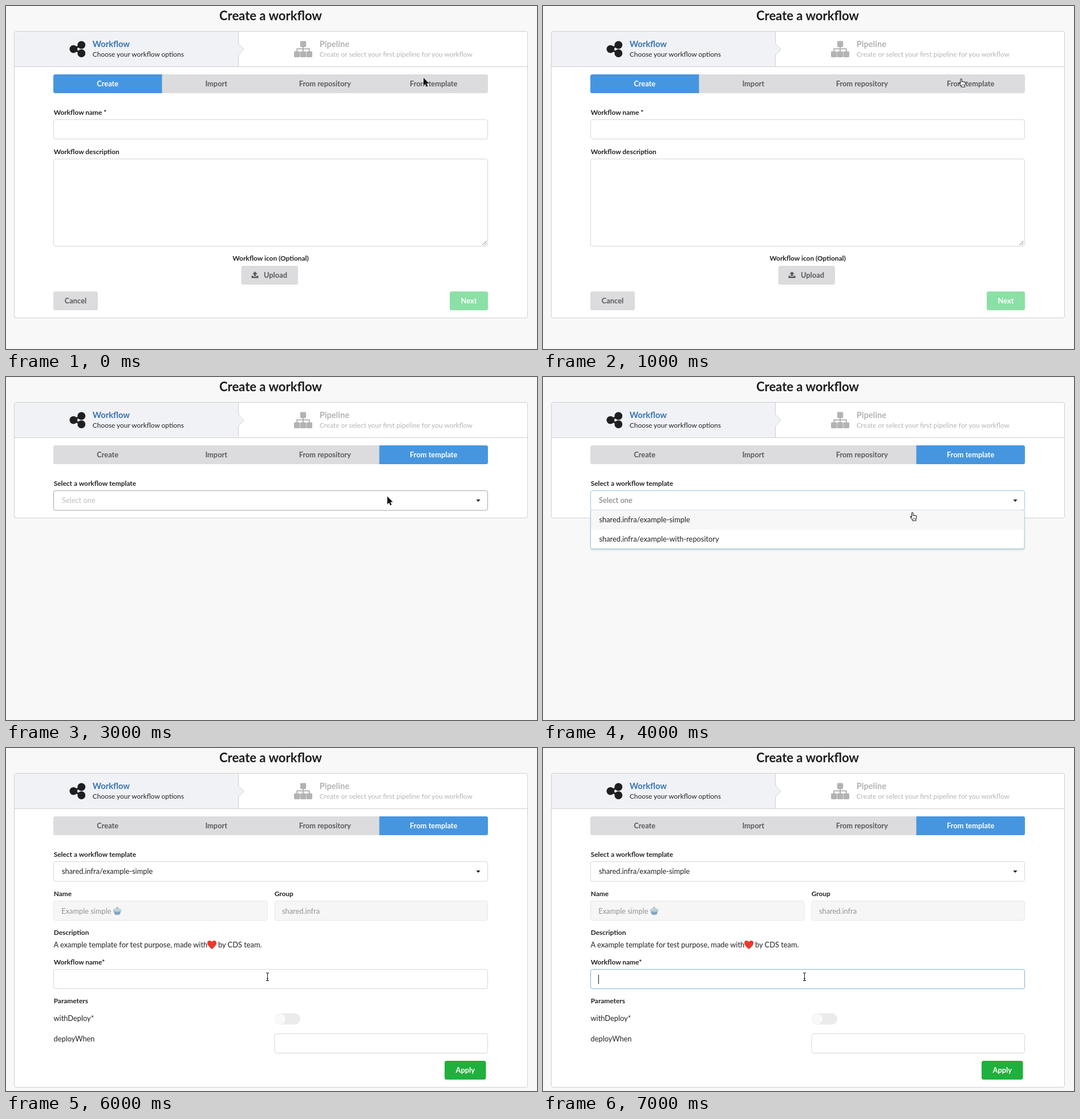
Write an HTML page that moves like this. It is 931 by 602 pixels and loops after 8000 ms.

```html
<!DOCTYPE html>
<html lang="en">
<head>
<meta charset="utf-8">
<title>Create a workflow</title>
<style>
  html, body { margin: 0; width: 100%; height: 100%; overflow: hidden; background: #f8f8f8; }
  svg { display: block; width: 100%; height: 100%; }
  text { font-family: Lato, sans-serif; font-size: 12.83px; fill: #222; }
  .label { font-size: 11.92px; font-weight: 700; }
  .small { font-size: 11.92px; }
  .bold { font-weight: 700; }
  .step { font-size: 14.67px; font-weight: 700; }
  .title { font-size: 22px; font-weight: 700; }
  .mid { text-anchor: middle; }
</style>
</head>
<body>
<svg id="stage" viewBox="0 0 931 602"></svg>
<script>
const GREY = '#dcdcde', BLUE = '#4696df', LINE = '#d6d6d7', MUTED = '#b3b3b3';

const text = (x, y, str, cls = '', fill = '#222') =>
  `<text x="${x}" y="${y}" class="${cls}" style="fill:${fill}">${str}</text>`;
const rect = (x, y, w, h, fill, r = 0, extra = '') =>
  `<rect x="${x}" y="${y}" width="${w}" height="${h}" rx="${r}" fill="${fill}" ${extra}/>`;
const path = (d, fill, extra = '') => `<path d="${d}" fill="${fill}" ${extra}/>`;
const stroke = (color, width = 1) => `stroke="${color}" stroke-width="${width}"`;
const at = (x, y, body) => `<g transform="translate(${x} ${y})">${body}</g>`;
const label = (y, str, x = 83.7) => text(x, y, str, 'label');

// Boxes are given by their outer edges; the one pixel border lies inside.
const box = (x, y, right, bottom, line = LINE, fill = '#fff') =>
  rect(x + .5, y + .5, right - x - 1, bottom - y - 1, fill, 3.5, stroke(line));
const button = (x, y, w, str, fill, color, textX = x + w / 2) =>
  rect(x, y, w, 33, fill, 3.5) + text(textX, y + 20.7, str, 'bold mid', color);
const caret = (x, y) => rect(x, y, 1, 16, '#111');

const cursors = {
  arrow: path('M0 0V14L3.2 11L5.3 15.8L7.6 14.8L5.5 10.1H9.8Z', '#111', stroke('#fff', 1) + ' paint-order="stroke"'),
  hand: path('M3 9V2.2Q3 .8 4.2 .8Q5.4 .8 5.4 2.2V6Q6.4 4.8 7.5 6.2Q8.6 5.2 9.5 6.7Q11.4 6 11.5 8.2Q11.5 11.5 10.3 13V15.3H4.6V13.8Q3 12 .8 9Q.4 7.4 1.6 7.7Z', '#fff',
    stroke('#222', 1.1) + ' stroke-linejoin="round"') + path('M5.6 10V13M7.3 10V13M9 10V13', 'none', stroke('#444', .7)),
  beam: path('M-2.5 -7Q0 -7 0 -5V5Q0 7 -2.5 7M2.5 -7Q0 -7 0 -5M0 5Q0 7 2.5 7M-1.5 3H1.5', 'none', stroke('#222', 1.1))
};

const shareIcon = path('M132.3 68.3L118.3 75.6L132.3 83', 'none', stroke('#1f1f22', 3.3)) +
  [[118.3, 75.6], [132.3, 68.3], [132.3, 83]].map(([x, y]) => `<circle cx="${x}" cy="${y}" r="6.9" fill="#1f1f22"/>`).join('');

const treeIcon = path('M521 70V80M510.2 80V75.3H531.8V80', 'none', stroke(MUTED, 2)) +
  [[515.8, 61.5], [505, 79.5], [515.8, 79.5], [526.6, 79.5]].map(([x, y]) => rect(x, y, 10.4, 10.4, MUTED, 1.6)).join('');

const uploadIcon = path('M436.5 466L441 470.5H438.2V474H434.8V470.5H432Z', '#5a5a5c') +
  path('M430.5 473.5H433.8V475H439.2V473.5H442.5V477.5H430.5Z', '#5a5a5c');

const heart = path('M361 353C357 349.5 353 346.5 353 342.3C353 337.3 359 336.8 361 340.6C363 336.8 369 337.3 369 342.3C369 346.5 365 349.5 361 353Z', '#e9392c');

const cupcake = path('M188.5 286H201.5L199.6 292Q195 294 190.4 292Z', '#86a6c0') +
  path('M187.5 285.8Q186.8 282.5 190.5 282Q195 278 199.5 282Q203.2 282.5 202.5 285.8Q195 289 187.5 285.8Z', '#bcd3dc') +
  path('M193 281Q195 278.5 197 281Z', '#8fc39b') + '<circle cx="195" cy="279.5" r="1" fill="#c99a98"/>';

function frame(bottom) {
  return rect(0, 0, 931, 602, '#f8f8f8') +
    text(464, 25.3, 'Create a workflow', 'title mid', '#1d1d1f') +
    box(14, 44, 915, bottom, '#cfcfd0') +
    path('M15 106V48Q15 45 18 45H407V66L417 76L407 86V106Z', '#f1f2f6') +
    path('M407.5 45V66L417 76L407.5 86V106M14.5 106.5H914.5', 'none', stroke('#cfcfd0')) +
    shareIcon + text(151.8, 72, 'Workflow', 'step', '#3873b3') +
    text(151.8, 88.5, 'Choose your workflow options', 'small') +
    treeIcon + text(549.7, 72, 'Pipeline', 'step', MUTED) +
    text(549.7, 88.5, 'Create or select your first pipeline for you workflow', 'small', MUTED);
}

function tabs(active) {
  const w = 190.5, x = 83 + active * w;
  const tab = active ? `M${x} 120h${w - 3.5}q3.5 0 3.5 3.5v26q0 3.5 -3.5 3.5h${3.5 - w}z`
                     : `M${x + w} 120h${3.5 - w}q-3.5 0 -3.5 3.5v26q0 3.5 3.5 3.5h${w - 3.5}z`;
  return rect(83, 120, 762, 33, GREY, 3.5) + path(tab, BLUE) +
    ['Create', 'Import', 'From repository', 'From template'].map((name, i) =>
      text(83 + (i + .5) * w, 140.7, name, 'bold mid', i === active ? '#fff' : '#5a5a5c')).join('');
}

const createForm = () => frame(548) + tabs(0) +
  label(191, 'Workflow name *') + box(83, 199, 845, 234) +
  label(259.5, 'Workflow description') + box(83, 268, 845, 422) +
  path('M835.5 419.5L842.5 412.5M839.5 419.5L842.5 416.5', 'none', stroke('#777')) +
  text(464, 447, 'Workflow icon (Optional)', 'label mid') +
  button(412.5, 456, 99.5, 'Upload', GREY, '#5a5a5c', 472.5) + uploadIcon +
  button(83, 501, 78, 'Cancel', GREY, '#5a5a5c') +
  button(778, 501, 67, 'Next', '#8be0a6', '#fff');

const select = (value, color, line) => label(191, 'Select a workflow template') +
  box(83, 199, 845, 234.5, line) + text(98, 221.2, value, '', color) +
  path('M824.3 215H831.7L828 219Z', '#222');

const emptySelect = () => frame(248) + tabs(3) + select('Select one', '#bebebe', '#a6a6a7');

const openSelect = () => frame(248) + tabs(3) + select('Select one', '#777', '#96c8da') +
  path('M83.5 234V298Q83.5 301.5 87 301.5H840.5Q844 301.5 844 298V234', '#fff',
    stroke('#96c8da') + ' style="filter:drop-shadow(0 2px 1.5px rgba(34,36,38,.15))"') +
  rect(84, 234, 759.5, 34, '#f7f7f7') +
  text(98.5, 255.2, 'shared.infra/example-simple') +
  text(98.5, 289, 'shared.infra/example-with-repository');

const templateForm = focused => frame(596) + tabs(3) + select('shared.infra/example-simple', '#222') +
  label(259.5, 'Name') + box(83, 268, 458.5, 303, '#e6e6e7', '#f6f6f6') +
  text(97.3, 290.7, 'Example simple', '', '#939393') + cupcake +
  label(259.5, 'Group', 470.7) + box(470.5, 268, 845, 303, '#e6e6e7', '#f6f6f6') +
  text(484, 290.7, 'shared.infra', '', '#939393') +
  label(328.3, 'Description') +
  text(83.5, 350.3, 'A example template for test purpose, made with') + heart + text(372, 350.3, 'by CDS team.') +
  label(379.7, 'Workflow name*') + box(83, 388, 845, 423, focused ? '#85b0d5' : LINE) +
  label(448.2, 'Parameters') +
  text(83.5, 479.3, 'withDeploy*') + rect(470.5, 465.5, 45.5, 20, '#ebebeb', 10) +
  '<circle cx="480.5" cy="475.5" r="9.5" fill="#f9f9f9"/>' +
  text(83.5, 515, 'deployWhen') + box(470.5, 501, 845, 536) +
  button(769, 549, 72.5, 'Apply', '#20b03d', '#fff');

// One scene per second.
const scenes = [
  () => createForm() + at(732, 126, cursors.arrow),
  () => createForm() + at(729, 127, cursors.hand),
  () => createForm() + at(729, 127, cursors.hand),
  () => emptySelect() + at(668.5, 209.5, cursors.arrow),
  () => openSelect() + at(643.5, 237, cursors.hand),
  () => templateForm(false) + caret(97.5, 209) + at(637.5, 246.5, cursors.arrow),
  () => templateForm(false) + at(458.5, 401.5, cursors.beam),
  () => templateForm(true) + caret(97, 398) + at(458.5, 401.5, cursors.beam)
];

const stage = document.getElementById('stage');
const start = performance.now();
let shown = -1;
function draw() {
  const second = Math.floor((performance.now() - start) / 1000) % scenes.length;
  if (second !== shown) {
    shown = second;
    stage.innerHTML = scenes[second]();
  }
  requestAnimationFrame(draw);
}
draw();
</script>
</body>
</html>
```
